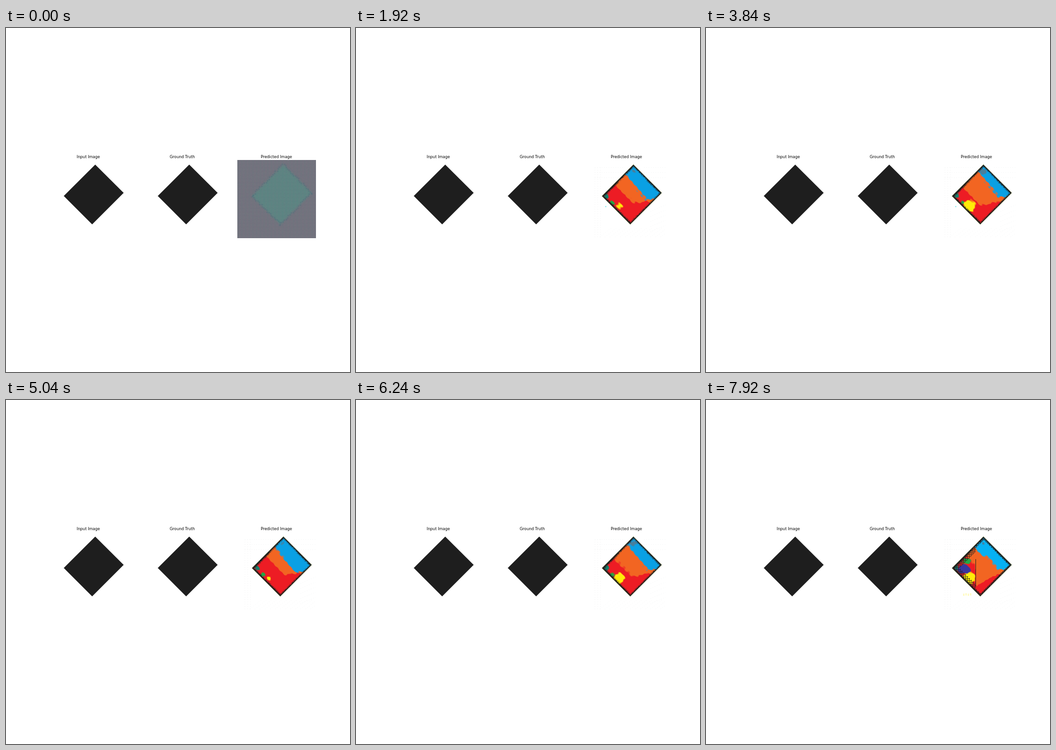
An HTML page with a canvas for the animation above (8000 ms loop, 748 px wide and 748 px high).

```html
<!DOCTYPE html>
<html lang="en">
<head>
<meta charset="utf-8">
<title>Prediction progress</title>
<style>
  html, body { margin: 0; width: 100%; height: 100%; overflow: hidden; background: #fff; }
  svg, canvas { position: absolute; left: 0; top: 0; width: 748px; height: 748px; }
  text { font: 8.33px "DejaVu Sans", sans-serif; text-anchor: middle; fill: #000; }
</style>
</head>
<body>
<canvas id="stage" width="748" height="748"></canvas>
<svg viewBox="0 0 748 748">
  <defs><path id="tile" d="M194 297 L255.8 358.4 L187.3 427 L125.6 365.2Z" fill="#1e1e1e"/></defs>
  <use href="#tile"/>
  <use href="#tile" x="204.4"/>
  <text x="179" y="283">Input Image</text>
  <text x="383.3" y="283">Ground Truth</text>
  <text x="588" y="283">Predicted Image</text>
</svg>
<script>
const ctx = document.getElementById('stage').getContext('2d');
const LOOP = 8000, STEP = 240, SIZE = 132;
const TOP = { x: 603.2, y: 297 }, WIDE = 87, TALL = 96.7;   // square-cornered tile turned by 45 degrees

const INK = [30, 30, 30], ORANGE = [242, 101, 34], RED = [237, 28, 36], SLATE = [72, 127, 156];
const BLUE = [10, 160, 228], BRIGHT_BLUE = [6, 177, 243];
const TEAL = [20, 128, 108], GREEN = [34, 168, 69], YELLOW = [255, 236, 8], INDIGO = [58, 53, 158];

const field = document.createElement('canvas');
field.width = field.height = SIZE;
const fieldCtx = field.getContext('2d');

const lerp = (a, b, k) => a + (b - a) * k;
const clamp = v => Math.min(1, Math.max(0, v));
const ease = (from, to, v) => { const k = clamp((v - from) / (to - from)); return k * k * (3 - 2 * k); };
const soft = distance => clamp(distance / 3 + .5);
const blend = (a, b, k) => k <= 0 ? a : a.map((v, i) => lerp(v, b[i], k));

function seeded(seed) {
  let s = seed * 7919 + 17;
  return () => {
    s = (s + 0x6D2B79F5) | 0;
    let t = Math.imul(s ^ (s >>> 15), 1 | s);
    t ^= t + Math.imul(t ^ (t >>> 7), 61 | t);
    return ((t ^ (t >>> 14)) >>> 0) / 4294967296;
  };
}

function inTileSpace(draw) {
  ctx.save();
  ctx.translate(TOP.x, TOP.y);
  ctx.rotate(Math.PI / 4);
  draw();
  ctx.restore();
}

function drawUntrained() {
  const rnd = seeded(1);
  ctx.fillStyle = '#73727d';
  ctx.fillRect(503, 287, 171, 170);
  inTileSpace(() => {
    ctx.filter = 'blur(2px)';
    ctx.fillStyle = '#5c8582';
    ctx.fillRect(0, 0, WIDE, TALL);
    ctx.filter = 'none';
    ctx.fillStyle = 'rgba(70, 106, 122, .35)';
    for (let d = 0; d < 1; d += .045) {
      [0, WIDE].forEach(u => ctx.fillRect(u + rnd() * 5 - 4, d * TALL, 3, 3));
      [0, TALL].forEach(v => ctx.fillRect(d * WIDE, v + rnd() * 5 - 4, 3, 3));
    }
  });
  const tints = ['#4f6d80', '#85777c', '#68907f', '#756b8c'];
  for (let y = 287; y < 457; y++) {
    for (let x = 503; x < 674; x++) {
      if (Math.sin(x * 2.36) + Math.sin(y * 2.36) + rnd() < .3) continue;
      ctx.globalAlpha = .12 + .2 * rnd();
      ctx.fillStyle = tints[(x % 2) + 2 * (y % 2)];
      ctx.fillRect(x, y, 1, 1);
    }
  }
  ctx.globalAlpha = 1;
}

function drawResidue(step) {
  const line = (x, y, x2, y2) => { ctx.moveTo(x, y); ctx.lineTo(x2, y2); };
  ctx.strokeStyle = '#f6f7f7';
  ctx.setLineDash([2, 3]);
  ctx.beginPath();
  for (let i = 0; i < 3; i++) {
    line(519, 303.5 + i * 11, 585, 303.5 + i * 11);
    line(626, 303.5 + i * 11, 673, 303.5 + i * 11);
    line(519.5 + i * 6, 303, 519.5 + i * 6, 455);
  }
  for (let x = 530; x < 672; x += 11) {
    const length = Math.min(26, 673 - x);
    line(x, 455, x + length, 455 - length * .8);
  }
  for (let y = 385; y < 440; y += 11) line(640, y + 14, 673, y);
  ctx.stroke();
  ctx.setLineDash([]);
  if (step < 20) {
    ctx.fillStyle = '#52e2e4';
    ctx.fillRect(542.5, 387, 1.5, 2.5);
  }
}

// The blue and red bands breathe together; "late" turns the left corner into separate patches.
function makePainter(step) {
  const rnd = seeded(step);
  const swing = Math.cos((step - 4) / 12 * Math.PI * 2);
  const late = ease(26, 33, step);
  const blue = blend(BLUE, BRIGHT_BLUE, late);
  const yellowSize = lerp(8 + 5 * swing, 13, late);
  const patches = [
    { color: TEAL, x: 544, y: 365, rx: 5, ry: 6 },
    { color: GREEN, x: lerp(557, 566, late), y: lerp(380, 350, late), rx: lerp(5, 9, late), ry: lerp(4, 6, late) },
    { color: YELLOW, x: 572, y: 387, rx: yellowSize, ry: yellowSize },
    { color: INDIGO, x: 561, y: 367, rx: 14 * late, ry: 10 * late },
    { color: SLATE, x: 602, y: 311, rx: 5 + 3 * swing, ry: 4 + 2 * swing }
  ];

  return (x, y) => {
    const u = (x - TOP.x + y - TOP.y) / Math.SQRT2;
    const v = (y - TOP.y - x + TOP.x) / Math.SQRT2;
    const edge = Math.min(u, v, WIDE - u, TALL - v);
    const wobble = 2.5 * Math.sin(x * .33 + step) * Math.sin(y * .29 - step * 1.7)
      + 1.5 * Math.sin((x - y) * .5 + step * 2.3) + rnd() - .5;

    const right = soft(x - 586);
    const blueDepth = 24 + u / 9 - 5 * swing - 8 * late * ease(20, 45, u) - 1.2 * Math.max(0, u - 72);
    const plateau = lerp(61 + 5 * swing, 100, late * right);
    const redDepth = lerp(plateau, 31, ease(56, 84, u));

    let color = blend(ORANGE, RED, soft(v - redDepth + wobble));
    color = blend(color, blue, soft(blueDepth - v + wobble));
    for (const p of patches) {
      if (p.rx < 1) continue;
      const inside = (1 - Math.hypot((x - p.x) / p.rx, (y - p.y) / p.ry)) * p.rx;
      color = blend(color, p.color, soft(inside + wobble * .7) * (1 - late * right * (p.color === YELLOW)));
    }
    const onGrid = x % 4 === 0 || y % 4 === 0;
    if (onGrid && edge < lerp(11, 5, right)) color = blend(color, INK, late * .85);
    if (x === 586 && y > 345 && y < 406) color = blend(color, INK, late);
    const border = v > TALL / 2 || u > WIDE / 2 ? 3.4 : 2.8;
    return blend(color, INK, soft(border - edge + (rnd() - .5) * 2.5));
  };
}

function drawPrediction(step) {
  drawResidue(step);
  const paint = makePainter(step);
  const image = fieldCtx.createImageData(SIZE, SIZE);
  for (let y = 0, i = 0; y < SIZE; y++) {
    for (let x = 0; x < SIZE; x++, i += 4) {
      image.data.set([...paint(x + 535, y + 296), 255], i);
    }
  }
  fieldCtx.putImageData(image, 0, 0);

  ctx.save();
  inTileSpace(() => {
    ctx.strokeStyle = '#e3efbd';
    ctx.lineWidth = 1.5;
    ctx.strokeRect(0, 0, WIDE, TALL);
    ctx.beginPath();
    ctx.rect(0, 0, WIDE, TALL);
  });
  ctx.clip();
  ctx.drawImage(field, 535, 296);
  if (step < 4) {
    ctx.fillStyle = `rgba(77, 104, 96, ${.8 * .5 ** step})`;
    ctx.fillRect(535, 296, SIZE, SIZE);
  }
  ctx.restore();

  if (step > 31) {
    ctx.fillStyle = '#fffbc4';
    for (let x = 559; x < 578; x += 5) ctx.fillRect(x, 420 + x % 2, 3, 5);
  }
}

let shown = -1;
function tick() {
  const step = Math.floor((performance.now() % LOOP) / STEP);
  if (step !== shown) {
    shown = step;
    ctx.clearRect(0, 0, 748, 748);
    if (step === 0) drawUntrained();
    else drawPrediction(step);
  }
  requestAnimationFrame(tick);
}
tick();
</script>
</body>
</html>
```
